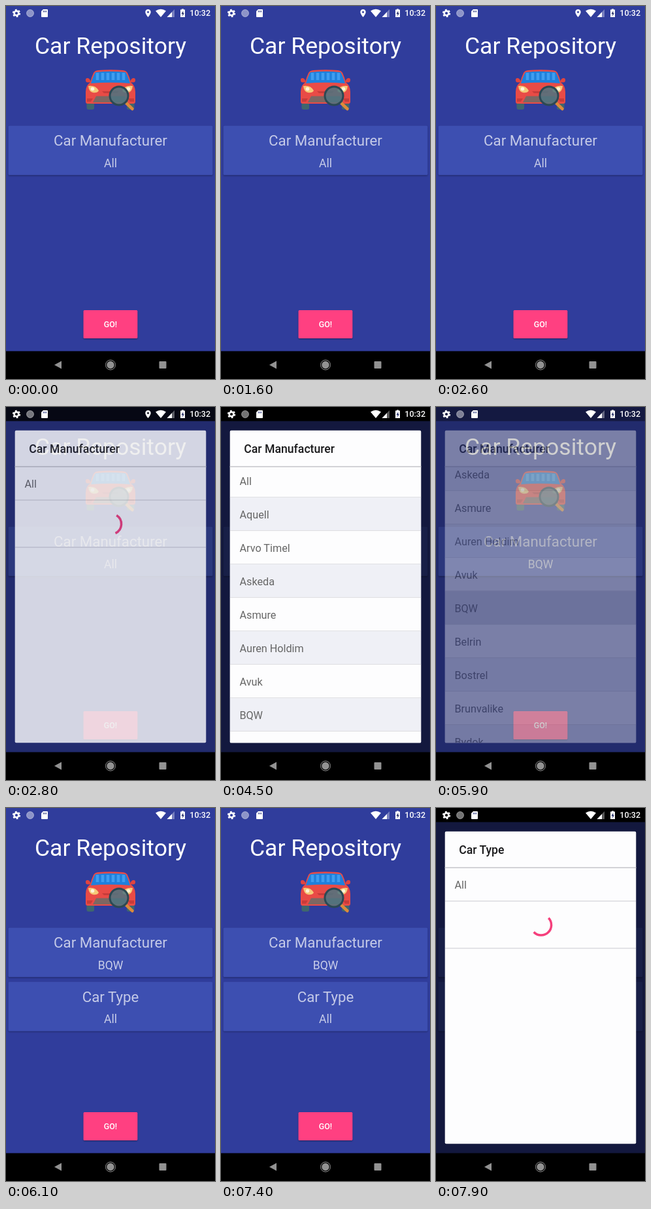
Animation of 320 by 569 pixels, one loop 8 s. Source, as an HTML page:

```html
<!DOCTYPE html>
<html lang="en">
<head>
<meta charset="utf-8">
<title>Car Repository</title>
<style>
  html, body { margin: 0; width: 100%; height: 100%; overflow: hidden; background: #000; }
  svg { display: block; width: 100%; height: 100%; }
  text { font-family: Roboto, "Noto Sans", sans-serif; }
  .mid { text-anchor: middle; fill: #fff; }
  .med { font-weight: 500; }
  .head { font-size: 22.3px; fill-opacity: .7; }
  .value { font-size: 17.6px; fill-opacity: .72; }
  .item { font-size: 16.2px; fill: #666; }
</style>
</head>
<body>
<svg viewBox="0 0 320 569">
  <defs>
    <filter id="lift" x="-10%" y="-20%" width="120%" height="150%">
      <feDropShadow dx="0" dy="1.2" stdDeviation=".9" flood-color="#000" flood-opacity=".35"/>
    </filter>
    <clipPath id="listClip"><rect x="13.700" y="91" width="292.600" height="421.200"/></clipPath>
    <clipPath id="glass"><path d="M137 101Q160 98.500 183 101Q186 105 190 118Q160 115.500 130 118Q134 105 137 101Z"/></clipPath>
  </defs>

  <rect width="320" height="527" fill="#303d9c"/>

  <text class="mid" x="160" y="72.800" font-size="35.600">Car Repository</text>

  <g id="car">
    <path d="M123.500 144H135V155.500Q135 158 132 158H126.500Q123.500 158 123.500 155ZM185 144H196.500V155Q196.500 158 193.500 158H188Q185 158 185 155.500Z" fill="#3f666e"/>
    <path d="M141 98Q160 96.500 179 98Q184 98.500 186 102Q189 108 191 116.500Q198 121 198 131V146Q198 149 195 149H125Q122 149 122 146V131Q122 121 129 116.500Q131 108 134 102Q136 98.500 141 98Z" fill="#e94b46"/>
    <path d="M122 113Q122 109.500 125 110Q129 110.500 130 116.500H125Q122 116.500 122 113ZM198 113Q198 109.500 195 110Q191 110.500 190 116.500H195Q198 116.500 198 113Z" fill="#e1443f"/>
    <g clip-path="url(#glass)">
      <rect x="128" y="97" width="64" height="22" fill="#1f80dc"/>
      <path d="M140 102V113M148 102V113M156 102V113M164 102V113M172 102V113M180 102V113" stroke="#3f9df0" stroke-width="4.500"/>
    </g>
    <path d="M126 122Q137 120 142 129Q140 133 133 132Q127 131 126 122ZM194 122Q183 120 178 129Q180 133 187 132Q193 131 194 122Z" fill="#f5c978"/>
    <circle cx="132.500" cy="126.500" r="2.800" fill="#fff3d6"/>
    <circle cx="187.500" cy="126.500" r="2.800" fill="#fff3d6"/>
    <path d="M147 130H173L170 133H150Z" fill="#c83c3a"/>
    <path d="M138 137.500H182L187 147H133Z" fill="#7d6762"/>
    <path d="M124 141H133L130 146H124ZM196 141H187L190 146H196Z" fill="#c83c3a"/>
    <path d="M184 148L193.500 157" stroke="#dc8a3b" stroke-width="4.500" stroke-linecap="round"/>
    <circle cx="173" cy="137" r="14" fill="#4d7480" fill-opacity=".86" stroke="#2c4954" stroke-width="3"/>
  </g>

  <g id="makerCard">
    <rect x="3.700" y="182.700" width="312.600" height="75" rx="1.500" fill="#3d4fb1" filter="url(#lift)"/>
    <text class="mid head" x="160" y="213.400">Car Manufacturer</text>
    <text class="mid value" id="maker" x="160" y="245.700">All</text>
  </g>
  <g id="typeCard">
    <rect x="3.700" y="265.200" width="312.600" height="75" rx="1.500" fill="#3d4fb1" filter="url(#lift)"/>
    <text class="mid head" x="160" y="295.700">Car Type</text>
    <text class="mid value" x="160" y="328">All</text>
  </g>

  <rect x="118.600" y="464" width="82.700" height="43" rx="1.500" fill="#ff4081" filter="url(#lift)"/>
  <text class="mid med" x="160" y="490.300" font-size="12.400">GO!</text>

  <rect id="dim" width="320" height="527"/>

  <g id="dialog">
    <rect width="320" height="21.500"/>
    <rect x="13.700" y="35.700" width="292.600" height="476.600" rx="2" fill="#fdfdfe"/>
    <text class="med" id="dialogTitle" x="35.300" y="70" font-size="17.650" fill="#1a1a1c"></text>
    <g id="loading">
      <text class="item" x="28.500" y="122.700">All</text>
      <path d="M14 142H306M14 214H306" stroke="#dcdcdf" stroke-width="1.500"/>
      <path id="arc" fill="none" stroke="#f53f7c" stroke-width="3.500"/>
    </g>
    <g id="list" clip-path="url(#listClip)"><g id="rows"></g></g>
    <path d="M13.700 91H306.300" stroke="#d3d3d6" stroke-width="1.800"/>
  </g>

  <g id="status" fill="#fff">
    <circle cx="16" cy="11" r="3.400" fill="none" stroke="#fff" stroke-width="2.600"/>
    <circle cx="16" cy="11" r="5.200" fill="none" stroke="#fff" stroke-width="2" stroke-dasharray="2.700 2.745"/>
    <circle cx="37" cy="11" r="5.500" fill-opacity=".45" stroke="#fff" stroke-opacity=".4"/>
    <path d="M57 5H63Q64 5 64 6V16Q64 17 63 17H55Q54 17 54 16V8Z"/>
    <path d="M57.500 7V9.500M59.500 7V9.500M61.500 7V9.500" stroke="#2b3780"/>
    <path id="pin" fill-rule="evenodd" d="M217.500 5A4.200 4.200 0 0 1 221.700 9.200Q221.700 12 217.500 17Q213.300 12 213.300 9.200A4.200 4.200 0 0 1 217.500 5ZM217.500 7.700A1.500 1.500 0 1 0 217.500 10.700A1.500 1.500 0 1 0 217.500 7.700Z"/>
    <path d="M229 7.500Q237 2 245 7.500L237 17Z"/>
    <path d="M258 5V17H246.500Z" fill-opacity=".35"/>
    <path d="M254 9.200V17H246.500Z"/>
    <path d="M269 4.500H272V5.500H274V17H267V5.500H269Z"/>
    <path d="M271.300 7.500L268.500 12H270.300V15.500L272.800 10.800H271.300Z" fill="#222c68"/>
    <text class="med" x="281.300" y="15.400" font-size="12.500">10:32</text>
  </g>

  <rect y="526.500" width="320" height="42.500" fill="#000"/>
  <g fill="#929292">
    <path d="M74 547.500L85 541.500V553.500Z"/>
    <circle cx="160" cy="547.500" r="5.700"/>
    <circle cx="160" cy="547.500" r="7.500" fill="none" stroke="#929292"/>
    <rect x="234.500" y="542" width="11" height="11" rx="1"/>
  </g>
</svg>
<script>
const LOOP = 8000, STEP = 100;
const ROW = 51, LIST_TOP = 91.2;
const PICK = 7;
const makers = ["All", "Aquell", "Arvo Timel", "Askeda", "Asmure", "Auren Holdim",
  "Avuk", "BQW", "Belrin", "Bostrel", "Brunvalike", "Bydok", "Cadrune"];

const $ = id => document.getElementById(id);
const clamp = x => Math.min(1, Math.max(0, x));
const show = (id, on) => $(id).setAttribute("display", on ? "inline" : "none");

$("rows").innerHTML = makers.map((name, i) => {
  const y = LIST_TOP + i * ROW;
  return `<rect id="row${i}" x="13.7" y="${y}" width="292.6" height="${ROW}" fill="${i % 2 ? "#eff0f6" : "#fdfdfe"}"/>
    <path d="M13.7 ${y + ROW - .5}H306.3" stroke="#dadade"/>
    <text class="item" x="28.5" y="${y + 31.5}">${name}</text>`;
}).join("");

// Cubic bezier (.4, 0, .2, 1) solved by bisection
function standardEase(x) {
  let lo = 0, hi = 1;
  for (let i = 0; i < 24; i++) {
    const s = (lo + hi) / 2, r = 1 - s;
    if (1.2 * r * r * s + .6 * r * s * s + s ** 3 < x) lo = s; else hi = s;
  }
  return lo * lo * (3 - 2 * lo);
}

function drawSpinner(age) {
  const cycle = Math.max(0, age) % 1333 / 1333;
  const turn = -109 + age * 720 / 4444 + cycle * 90;
  const from = turn + 270 * standardEase(clamp(cycle * 2 - 1));
  const to = Math.max(from + 8, turn + 270 * standardEase(clamp(cycle * 2)));
  const point = deg => {
    const a = deg * Math.PI / 180;
    return `${161 + 15.6 * Math.cos(a)} ${178.5 + 15.6 * Math.sin(a)}`;
  };
  $("arc").setAttribute("d", `M${point(from)}A15.6 15.6 0 ${to - from > 180 ? 1 : 0} 1 ${point(to)}`);
}

function scrollAt(t) {
  if (t < 4500) return 0;
  const p = clamp((t - 4500) / 700);
  return 4 + 163 * (1 - (1 - p ** 1.3) ** 2);
}

function render(t) {
  const second = t >= 6000;
  const age = second ? t - 7615 : Math.min(t, 3300) - 2578;
  const closing = !second && t >= 5900;
  const alpha = closing ? .4 : clamp((age - 100) / 150);
  const dim = closing ? .3 : .6 * clamp((age - 160) / 125);
  const loaded = !second && t >= 3600;

  $("maker").textContent = t >= 5900 ? makers[PICK] : "All";
  show("typeCard", second);
  show("pin", t < 3000);
  $("dim").setAttribute("opacity", dim);
  $("dialog").setAttribute("opacity", alpha);
  show("dialog", alpha > 0);
  $("dialogTitle").textContent = second ? "Car Type" : "Car Manufacturer";
  show("loading", !loaded);
  show("list", loaded);
  $("rows").setAttribute("transform", `translate(0 ${-scrollAt(t)})`);
  $("row" + PICK).setAttribute("fill", t >= 5800 && t < 6000 ? "#dcdde3" : "#eff0f6");
  drawSpinner(age);
}

const start = performance.now();
function tick() {
  const t = (performance.now() - start) % LOOP;
  render(Math.floor(t / STEP) * STEP);
  requestAnimationFrame(tick);
}
tick();
</script>
</body>
</html>
```
